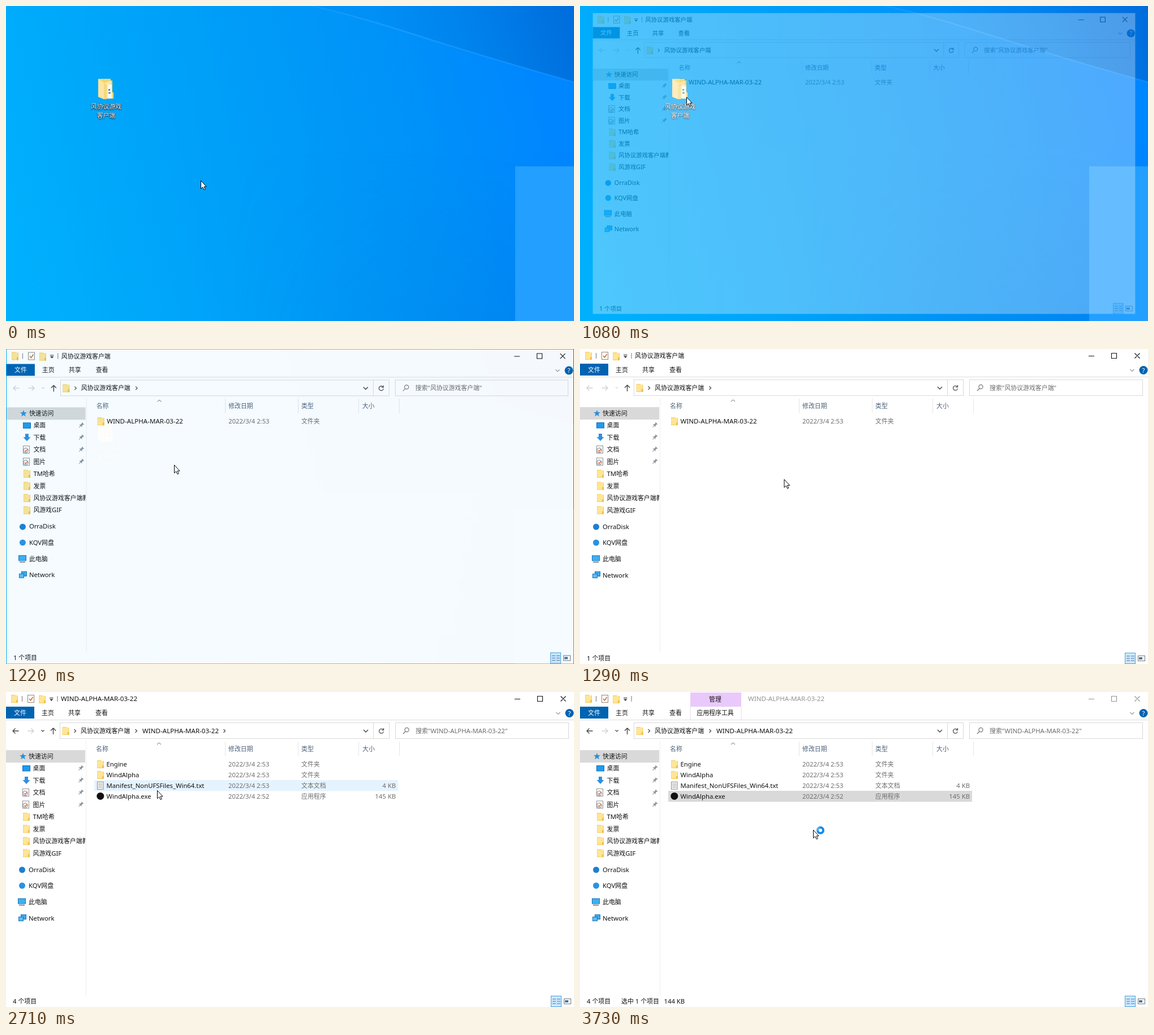
These frames come from a looping animation (1004 px wide and 558 px high, 3800 ms). An HTML page:

```html
<!DOCTYPE html>
<html lang="zh-CN">
<head>
<meta charset="utf-8">
<title>打开文件夹</title>
<style>
html, body { margin: 0; width: 100%; height: 100%; overflow: hidden; background: #00a0f8; }
svg { display: block; width: 1004px; height: 558px; }
text { font: 11.3px "Noto Sans", "Open Sans", "Noto Sans CJK SC", "Noto Sans CJK", sans-serif; fill: #111; }
.cjk { font-family: "Noto Sans CJK SC", "Noto Sans CJK", sans-serif; font-size: 10.9px; }
.line { fill: none; stroke: #444; stroke-width: 1.2; }
.off { display: none; }
#icon text { fill: #fff; filter: drop-shadow(.8px .8px .4px #000) drop-shadow(.5px 1px 1px #001a33); }
</style>
</head>
<body>
<svg viewBox="0 0 1004 558">
  <defs>
    <linearGradient id="sky" gradientUnits="userSpaceOnUse" x1="0" y1="420" x2="960" y2="170">
      <stop offset="0" stop-color="#00b0fd"/>
      <stop offset=".4" stop-color="#00a0f8"/>
      <stop offset=".75" stop-color="#0092f8"/>
      <stop offset="1" stop-color="#0086ff"/>
    </linearGradient>
    <linearGradient id="dusk" gradientUnits="userSpaceOnUse" x1="680" y1="110" x2="1004" y2="0">
      <stop offset="0" stop-color="#0090f6"/>
      <stop offset=".45" stop-color="#0082ec"/>
      <stop offset="1" stop-color="#006cdc"/>
    </linearGradient>
    <linearGradient id="beam" gradientUnits="userSpaceOnUse" x1="520" y1="0" x2="1004" y2="0">
      <stop offset="0" stop-color="#20a4ff" stop-opacity=".3"/>
      <stop offset=".3" stop-color="#1ca0ff" stop-opacity=".8"/>
      <stop offset="1" stop-color="#1090ff" stop-opacity=".8"/>
    </linearGradient>
    <linearGradient id="shade" x1="0" y1="0" x2="0" y2="1">
      <stop offset=".45" stop-color="#0070d8" stop-opacity="0"/>
      <stop offset="1" stop-color="#0070d8" stop-opacity=".28"/>
    </linearGradient>
    <linearGradient id="fade" x1="0" x2="1">
      <stop offset=".4" stop-color="#000"/>
      <stop offset="1" stop-color="#fff"/>
    </linearGradient>
    <mask id="right"><rect width="1004" height="558" fill="url(#fade)"/></mask>
    <clipPath id="side"><rect y="85" width="140" height="450"/></clipPath>
  </defs>
  <rect width="1004" height="558" fill="url(#sky)"/>
  <rect width="1004" height="558" fill="url(#shade)" mask="url(#right)"/>
  <path d="M522 -4Q595 10 720 50T1004 135V-4Z" fill="url(#dusk)"/>
  <path d="M522 -4Q595 10 720 50T1004 135" fill="none" stroke="url(#beam)" stroke-width="2.4"/>
  <rect x="900" y="284" width="104" height="274" fill="#229fff"/>
  <g id="icon">
    <rect id="glow" x="144.5" y="123.5" width="65" height="79" fill="#fff" stroke="#fff"/>
    <path d="M163 129h22v3h3v20l2 2v10h-18z" fill="#f8d466"/>
    <path d="M172 137l14-5v31l-14 2z" fill="#fce7a6"/>
    <path d="M180 139h7v25h-7z" fill="#fdf8e8"/>
    <path d="M181 147h3v3h-3z" fill="#3f9c94"/>
    <path d="M181 153h4v2h-4z" fill="#3f78b0"/>
    <path d="M163 129l10 7v29l-10-4z" fill="#ffe5a0"/>
    <path d="M173 136l5 4v25l-5 0z" fill="#f7d77e"/>
    <path d="M187 152l3 2v10h-3z" fill="#f8dc88"/>
  </g>
  <g id="win"></g>
  <g id="cursor">
    <path d="M.5 .5V14.8L3.7 11.8L6.1 16.7L8.3 15.7L6 11H10.2Z" fill="#fff" stroke="#000"/>
    <g id="busy">
      <circle cx="13" cy="1" r="5" fill="#fff" stroke="#128be6" stroke-width="4"/>
      <path d="M8.2 2.5A5 5 0 0 1 11.5 -3.8" fill="none" stroke="#4db4f5" stroke-width="3"/>
    </g>
  </g>
</svg>
<script>
const $ = id => document.getElementById(id);

// Text is placed by its vertical centre; Chinese runs get their own size.
function text(x, y, str, o = {}) {
  const runs = str.replace(/[\u3400-\u9fff]+/g, '<tspan class="cjk">$&</tspan>');
  const size = o.size ? ` style="font-size:${o.size}px"` : '';
  return `<text x="${x}" y="${y + 4}" text-anchor="${o.at || 'start'}"` +
    `${o.fill ? ` style="fill:${o.fill}"` : size}>${runs}</text>`;
}
const rect = (x, y, w, h, fill, more = '') =>
  `<rect x="${x}" y="${y}" width="${w}" height="${h}" fill="${fill}" ${more}/>`;
const line = (d, color = '#444', w = 1.2) =>
  `<path class="line" d="${d}" style="stroke:${color};stroke-width:${w}"/>`;
const shape = (d, fill) => `<path d="${d}" fill="${fill}"/>`;
const group = (id, body) => `<g id="${id}">${body}</g>`;
const right = (x, y) => line(`M${x - 1.5} ${y - 3}l3 3l-3 3`);
const folder = (x, y) =>
  shape(`M${x} ${y}h7l1 1h4v13h-12z`, '#f3cb5e') + rect(x + .5, y + 1, 10.5, 12, '#ffe596') +
  shape(`M${x + 9} ${y + 9}h3v5h-3z`, '#eec04c');
const check = (x, y) =>
  rect(x + .5, y + .5, 11, 13, '#fff', 'stroke="#888"') + line(`M${x + 3} ${y + 7}l2.5 3l4-6`, '#d2691e', 1.5);
const pin = (x, y) =>
  `<g transform="translate(${x} ${y}) rotate(45)">` + shape('M-2.5 -5h5v1.2h-1v3l2 2h-7l2-2v-3h-1zM-.5 1h1v4h-1z', '#8b949c') + '</g>';
const monitor = (x, y, color) =>
  rect(x + .5, y - 5.5, 13, 9, color, 'stroke="#1672b8"') + line(`M${x + 2} ${y + 6}h10`, '#555', 1.3);
const shield = (x, y) =>
  rect(x + 1.5, y - 6.5, 11, 13, '#fff', 'stroke="#8a9097"') +
  `<circle cx="${x + 6}" cy="${y + 1.5}" r="4.2" fill="#fff" stroke="#6a7076"/>` +
  line(`M${x + 4} ${y + 1.5}l2 2l3-4`, '#d8602c', 1.4);

const PROJECT = '风协议游戏客户端', BUILD = 'WIND-ALPHA-MAR-03-22';
const wide = { size: 11.6 }, grey = { fill: '#6d6d6d' }, head = { fill: '#4c607a' };

function sidebar() {
  let out = rect(0, 103, 140, 22, '#d9d9d9') +
    shape('M30 108l1.6 4h4.4l-3.4 2.8l1.2 4.4l-3.8-2.5l-3.8 2.5l1.2-4.4l-3.4-2.8h4.4z', '#2b8fdb') +
    text(40, 114, '快速访问');
  const names = ['桌面', '下载', '文档', '图片', 'TM哈希', '发票', PROJECT + '教', '风游戏GIF'];
  names.forEach((name, i) => {
    const y = 135 + i * 21.5;
    out += text(47.5, y, name);
    out += i > 3 ? folder(30, y - 7) : pin(132, y);
  });
  out += rect(29.5, 130.5, 13, 9.5, '#1e9bf0', 'stroke="#0f6cb5"') +
    shape('M33 150h6v6h3.5l-6.5 7l-6.5-7h3.5z', '#2f8fe0') + shield(28, 178) + shield(28, 199.5);
  ['OrraDisk', 'KQV网盘', '此电脑', 'Network'].forEach((name, i) => out += text(40, 314.5 + i * 28.7, name));
  out += '<circle cx="28.5" cy="315" r="5.5" fill="#1f7fd0"/><circle cx="28.5" cy="343" r="5.5" fill="#2a92e2"/>' +
    monitor(21, 371.5, '#3fb0f2') +
    rect(26.5, 394.5, 9, 8, '#3fa9ec', 'stroke="#1672b8"') + rect(22.5, 398.5, 8, 7, '#5dbcf5', 'stroke="#1672b8"');
  return `<g clip-path="url(#side)">${out}</g>` + line('M141.5 87V538', '#f0f0f0', 1);
}

function row(i, name, type, icon, date, size) {
  const y = 128 + i * 18.9;
  return icon(y) + text(177.5, y, name, name === BUILD ? wide : {}) + text(393, y, date, grey) +
    text(522, y, type, grey) + (size ? text(689, y, size, { at: 'end', fill: '#6d6d6d' }) : '');
}
const dir = y => folder(161, y - 7);
const doc = y => rect(161.5, y - 6.5, 10.5, 13, '#fff', 'stroke="#888"') +
  [-3.5, -1.2, 1.2, 3.5].map(d => line(`M163 ${y + d}h7.5`, '#999', .9)).join('');
const app = y => `<circle cx="166.8" cy="${y - .3}" r="6.5" fill="#111"/>`;

function chrome() {
  return folder(9, 5) + line('M28.5 7V17M91 7V17', '#777', 1) + check(38, 5) + folder(58, 6) +
    line('M77 10.5h6.5') + shape('M77 12.5h6.5l-3.2 3.5z', '#333') +
    group('buttons', line('M899 12.5h10M939.5 7.5h9v9h-9zM980.5 7.5l9 9M989.5 7.5l-9 9', '#111', 1.1)) +
    rect(0, 26, 50, 21, '#0063b1') + text(25, 36.5, '文件', { at: 'middle', fill: '#fff' }) +
    text(63, 37, '主页') + text(110, 37, '共享') + text(158, 37, '查看') +
    line('M0 49.5H1004', '#dcdddf', 1) + line('M972.5 36l3.5 3.5l3.5-3.5', '#999') +
    '<circle cx="996" cy="37.5" r="7.5" fill="#0063b1"/>' + text(996, 37.5, '?', { at: 'middle', fill: '#fff' }) +
    line('M49 69H38.5M44.5 64.5l4.5 4.5l-4.5 4.5', '#cfcfcf', 1.3) +
    line('M83.5 75V64M79 68.5l4.5-4.5l4.5 4.5', '#444', 1.4) +
    rect(95.5, 54.5, 582, 28, '#fff', 'stroke="#d9d9d9"') + line('M649.5 55V82', '#d9d9d9', 1) +
    folder(99.5, 62) + right(122, 69) + text(132, 68.5, PROJECT) +
    line('M632 67l4 4l4-4', '#444', 1.4) +
    line('M666.5 66.5A4 4 0 1 0 667.5 70M667.5 64v3.5h-3.5') +
    rect(688.5, 54.5, 306, 28, '#fff', 'stroke="#d9d9d9"') +
    '<circle class="line" cx="708.5" cy="67" r="3.6" style="stroke:#777"/>' + line('M706 70l-4 4', '#777');
}

function columns() {
  return [[159, '名称'], [393, '修改日期'], [522, '类型'], [630, '大小']]
    .map(([x, s]) => text(x, 101, s, head)).join('') +
    line('M387.5 88V113M516.5 88V113M623.5 88V113M695.5 88V113', '#e5e5e5', 1) +
    line('M267 93l3.5-3l3.5 3', '#666', 1);
}

function status() {
  return rect(963.5, 538.5, 18, 19, '#cce8ff', 'stroke="#4aa3df"') +
    [544, 548, 552].map(y => line(`M966 ${y}h6M974 ${y}h6`, '#55748c', 1.1)).join('') +
    rect(986.5, 543.5, 12, 9, '#fff', 'stroke="#777"') + rect(988, 546, 6, 4, '#3d78a8');
}

$('icon').innerHTML += text(177, 178, '风协议游戏', { at: 'middle' }) + text(177, 194, '客户端', { at: 'middle' });

$('win').innerHTML = rect(0, 0, 1004, 558, '#fff') + chrome() + columns() + sidebar() + status() +
  rect(156, 118, 537, 19.5, '#e5f3ff', 'id="mark"') +
  group('outer',
    text(97, 12, PROJECT) + line('M22.5 69H12M16.5 64.5l-4.5 4.5l4.5 4.5', '#cfcfcf', 1.3) +
    line('M63 67.5l2 2l2-2', '#bbb', 1) + text(724, 68.5, `搜索"${PROJECT}"`, grey) +
    row(0, BUILD, '文件夹', dir, '2022/3/4 2:53') + text(12, 548, '1 个项目')) +
  group('inner',
    line('M22.5 69H12M16.5 64.5l-4.5 4.5l4.5 4.5', '#444', 1.3) + line('M62.5 67.5l2.5 2.5l2.5-2.5') + right(230, 69) +
    text(241, 68.5, BUILD, wide) + text(724, 68.5, `搜索"${BUILD}"`, grey) +
    row(0, 'Engine', '文件夹', dir, '2022/3/4 2:53') +
    row(1, 'WindAlpha', '文件夹', dir, '2022/3/4 2:53') +
    row(2, 'Manifest_NonUFSFiles_Win64.txt', '文本文档', doc, '2022/3/4 2:53', '4 KB') +
    row(3, 'WindAlpha.exe', '应用程序', app, '2022/3/4 2:52', '145 KB') + text(12, 548, '4 个项目')) +
  group('plain', text(97, 12, BUILD, wide)) +
  group('tools',
    rect(195, 1, 90, 25, '#e9c9fb') + line('M195 26V49M285 26V49', '#e2dce6', 1) +
    text(239, 13, '管理', { at: 'middle' }) + text(239, 37, '应用程序工具', { at: 'middle' }) +
    group('caption', text(297, 12, BUILD, wide)) +
    text(73, 548, '选中 1 个项目') + text(148.5, 548, '144 KB')) +
  group('arrowA', right(230, 69)) + group('arrowB', right(386, 69));

const POSES = 56, STEP = 3800 / POSES;
const path = [
  [0, 344, 309], [1, 341, 306], [4, 262, 236], [7, 183, 165], [8, 174, 157], [15, 174, 157],
  [16, 188, 161], [17, 226, 172], [18, 297, 205], [19, 360.5, 230.5], [21, 350, 222], [25, 309, 188],
  [26, 299, 150], [27, 295, 136], [36, 295, 136], [38, 284, 152], [40, 267, 174], [42, 246, 180],
  [52, 246, 180], [53, 266, 189], [54, 340, 219], [55, 412, 244], [56, 412, 244]
];

function at(p) {
  const i = path.findIndex(k => k[0] > p), a = path[i - 1], b = path[i];
  const f = (p - a[0]) / (b[0] - a[0]);
  return [a[1] + (b[1] - a[1]) * f, a[2] + (b[2] - a[2]) * f];
}
const show = (id, on) => $(id).classList.toggle('off', !on);

function draw(p) {
  const [x, y] = at(p), open = p - 16, inner = p >= 34, tools = p >= 48, idle = p >= 54;
  $('cursor').setAttribute('transform', `translate(${x} ${y})`);
  show('busy', p >= 53);

  show('glow', p >= 7 && p < 14);
  $('glow').style.opacity = p < 10 ? .18 : .3;

  show('win', open >= 0);
  const scale = [.955, .99, .998][open] || 1;
  $('win').setAttribute('transform', `translate(502 279) scale(${scale}) translate(-502 -279)`);
  $('win').style.opacity = [.3, .77, .96][open] || 1;

  show('outer', !inner);
  show('inner', inner);
  show('plain', inner && !tools);
  show('tools', tools);
  show('arrowA', p >= 18 && !inner);
  show('arrowB', p >= 37 && !idle);
  $('caption').style.opacity = $('buttons').style.opacity = idle ? .45 : 1;

  const i = Math.max(0, Math.min(3, Math.floor((y - 118) / 19)));
  const picked = (p >= 31 && !inner) || p >= 46;
  show('mark', p >= 29);
  $('mark').setAttribute('y', 118 + 19 * (p >= 46 ? 3 : i));
  $('mark').setAttribute('fill', idle ? '#d9d9d9' : picked ? '#cce8ff' : '#e5f3ff');
}

const start = performance.now();
function tick() {
  const t = Math.max(0, performance.now() - start) % 3800;
  draw(Math.min(POSES - 1, Math.floor((t + 13) / STEP)));
  requestAnimationFrame(tick);
}
tick();
</script>
</body>
</html>
```
